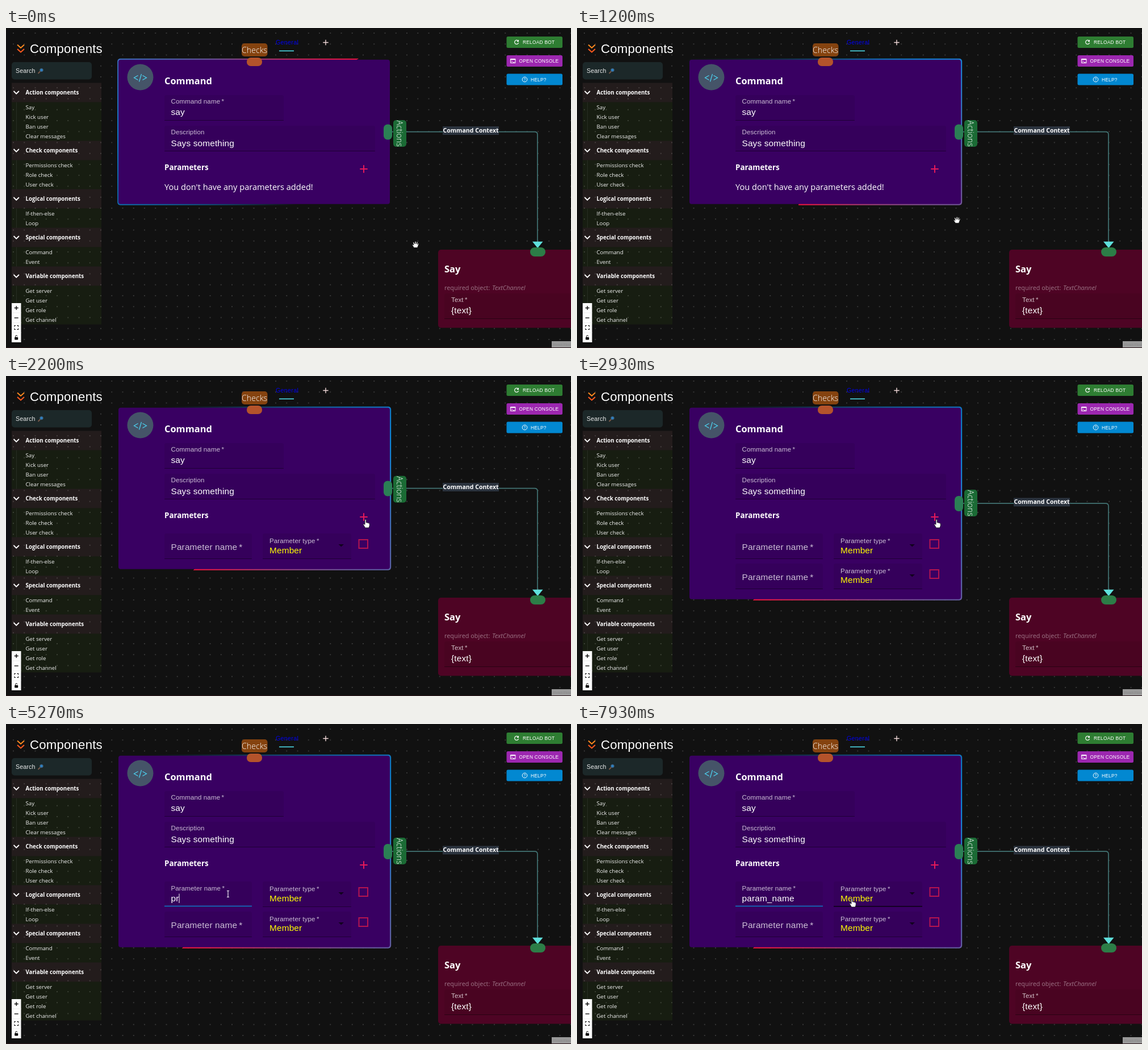
An HTML page that plays this animation: 995x563 px, repeating every 8000 ms.

```html
<!DOCTYPE html>
<html lang="en">
<head>
<meta charset="utf-8">
<title>Bot builder</title>
<style>
html, body { margin: 0; width: 100%; height: 100%; overflow: hidden; }
body { background: radial-gradient(circle, #484848 .5px, transparent 1.1px) 3.4px 18.6px / 19.25px 19.25px #111; }
#ring { position: absolute; left: 196px; top: 54px; width: 482px; border-radius: 5px; transform: translate(.2px, -.3px); }
svg { position: absolute; left: 0; top: 0; }
text { font-family: "Open Sans", "Noto Sans", sans-serif; fill: #fff; white-space: pre; }
.a { font-family: "Liberation Sans", Arial, sans-serif; letter-spacing: .00938em; }
.btn { letter-spacing: .02857em; }
.b { font-weight: 700; }
.l { font-weight: 300; }
.dim { fill-opacity: .75; }
</style>
</head>
<body>
<div id="ring"></div>
<svg id="stage" width="995" height="563" viewBox="0 0 995 563"></svg>
<script>
const text = (x, y, size, s, cls = '', more = '') =>
  `<text x="${x}" y="${y}" font-size="${size}" class="${cls}" ${more}>${s}</text>`;
const rect = (x, y, w, h, fill, r = 0, more = '') =>
  `<rect x="${x}" y="${y}" width="${w}" height="${h}" fill="${fill}" rx="${r}" ${more}/>`;
const line = (d, color, w = 1, more = '') =>
  `<path d="${d}" stroke="${color}" stroke-width="${w}" fill="none" ${more}/>`;
const shape = (d, fill, more = '') => `<path d="${d}" fill="${fill}" ${more}/>`;
const plus = (x, y, r, color, w) => line(`M${x - r} ${y}h${2 * r}M${x} ${y - r}v${2 * r}`, color, w);
const field = (x, y, w, h = 45) =>
  rect(x, y, w, h, '#000', 3, 'opacity=".07"') + rect(x, y + h - 1, w, 1, '#000', 0, 'opacity=".42"');
const label = (x, y, size, s, more) => text(x, y, size, s, 'a dim', more);

const BIG = 15.4, SMALL = 11.55;

function sidebar() {
  const sections = {
    Action: ['Say', 'Kick user', 'Ban user', 'Clear messages'],
    Check: ['Permissions check', 'Role check', 'User check'],
    Logical: ['If-then-else', 'Loop'],
    Special: ['Command', 'Event'],
    Variable: ['Get server', 'Get user', 'Get role', 'Get channel']
  };
  let out = line('M20 29.5l6 5.5 6-5.5', '#ff8a1f', 2) + line('M20 37l6 5.5 6-5.5', '#ff5a1f', 2) +
    text(42, 43.5, 22.2, 'Components', 'a') +
    rect(10, 60, 141, 30.5, '#1c2829', 5) + text(17, 79.3, 10.7, 'Search', 'a', 'fill-opacity=".9"') +
    line('M60.5 76l-4 4', '#7a5a4a', 1.8) +
    '<circle cx="62.5" cy="74" r="2.8" fill="#2f7fc0" stroke="#3d5a70"/>';
  let y = 96.5;
  for (const [name, items] of Object.entries(sections)) {
    const h = items.length * 17;
    out += rect(10, y, 158, 34, '#f79aa5', 0, 'opacity=".075"') +
      rect(10, y + 34, 158, h, '#90f020', 0, 'opacity=".05"') +
      line(`M18.5 ${y + 34}v${h}`, '#262c22') +
      line(`M13.5 ${y + 14.5}l4.7 4.7 4.7-4.7`, '#fff', 1.8) +
      text(34.5, y + 20.6, 9.7, name + ' components', 'b');
    items.forEach((s, i) => out += text(34.5, y + 46.3 + i * 16.9, 9.7, s, '', 'fill-opacity=".94"'));
    y += 34 + h;
  }
  return out + rect(10, 484, 16.5, 69, '#fefefe') +
    [501, 518.5, 536].map(v => line(`M10 ${v}h16.5`, '#eee')).join('') +
    plus(18.2, 492.5, 3.5, '#000', 1.3) + line('M14.7 510h7', '#000', 1.3) +
    line('M15 525.5v-2h2M19.5 523.5h2v2M21.5 528.5v2h-2M17 530.5h-2v-2', '#000', 1.1) +
    rect(15.2, 544, 6, 4.5, '#000', .8) + line('M16.6 544v-1.5a1.6 1.6 0 0 1 3.2 0', '#000', 1);
}

function toolbar() {
  const button = (y, fill, x, s) => rect(881.5, y, 98.5, 20, fill, 2.5) + text(x, y + 13, 8.4, s, 'a btn');
  return text(475, 28.5, 10.7, 'General', 'a btn', 'style="fill:#00e"') +
    rect(481, 39.5, 26, 1.6, '#4dd9e6') + plus(563, 25.5, 4.7, '#f0d8d8', 1.4) +
    button(15, '#2e7d32', 910, 'RELOAD BOT') + button(48, '#9c27b0', 903.5, 'OPEN CONSOLE') +
    button(80.5, '#0288d1', 924, 'HELP?') +
    line('M901.8 22.6a3.5 3.5 0 1 0 .8 3.2', '#fff', 1.2) + shape('M903 20.5v3.8h-3.8z', '#fff') +
    line('M888.5 54.5h8.5v7h-8.5zM888.5 55.5h8.5M890.2 57.5l1.5 1.3-1.5 1.3M893 60.3h2.5', '#fff', 1) +
    '<circle cx="913.5" cy="90.5" r="4.3" fill="none" stroke="#fff"/>' +
    text(911.6, 93.2, 7, '?', 'a');
}

function paramRow(id, dy, name) {
  return `<g id="${id}">` + field(279, 277 + dy, 154) + field(452, 277 + dy, 156) + name +
    label(464, 294.3 + dy, SMALL, 'Parameter type&thinsp;*') +
    text(464, 312 + dy * .983, BIG, 'Member', 'a', 'style="fill:#ff0"') +
    shape(`M585.5 ${296 + dy}h9.5l-4.75 4.5z`, '#12021f') +
    line(`M621.5 ${288 + dy}h15.5v15h-15.5z`, '#b5144f', 2) + '</g>';
}

function commandNode() {
  return rect(198, 55.7, 478, 254, '#390062', 4, 'id="body"') +
    rect(415, 27, 45.5, 23, '#85430f', 5) + text(415, 44, 14.2, 'Checks', 'l') +
    rect(424, 52, 27, 15, '#b4532b', 7) +
    '<circle cx="236.5" cy="86.5" r="23" fill="#455468"/>' +
    line('M232.5 83.5l-7 4 7 4M240.5 83.5l7 4-7 4M238.5 81l-4 13.5', '#4dd4f2', 1.2) +
    text(279, 98.7, 16.4, 'Command', 'b') +
    field(279, 118, 210) + label(290.5, 133, SMALL, 'Command name&thinsp;*') + text(290.5, 153.3, BIG, 'say', 'a') +
    field(279, 172, 371) + label(290.5, 187, SMALL, 'Description') + text(290.5, 207.5, BIG, 'Says something', 'a') +
    text(279, 250, 13.35, 'Parameters', 'b') + plus(630, 248, 6.7, '#e6195a', 2) +
    text(279, 285, 14.58, "You don't have any parameters added!", '', 'id="empty"') +
    paramRow('row1', 0, label(290.5, 306, BIG, 'Parameter name&thinsp;*', 'id="label"') +
      text(290.5, 312, BIG, '', 'a', 'id="value"') + rect(0, 298.5, 1, 16.5, '#fff', 0, 'id="caret"') +
      rect(279, 319.7, 154, 1.6, '#1976d2', 0, 'id="focus"') +
      rect(452, 320, 156, 1.3, '#10021c', 0, 'id="hover"')) +
    paramRow('row2', 53, label(290.5, 359, BIG, 'Parameter name&thinsp;*'));
}

function links() {
  return line('', '#427373', 1.7, 'id="edge"') + shape('M927 375.7h18.5l-9.25 11.5z', '#5fe0dc') +
    `<g id="tag">${rect(769, -10, 99, 15, '#2b333e')}${text(769.5, .9, 10.55, 'Command Context', 'b')}</g>` +
    `<g id="port">${rect(665, -13.5, 15, 27, '#2b7f55', 7)}</g>` +
    `<g id="actions">${rect(682, -23.5, 23, 47, '#1b6b35', 5)}${text(0, 0, 14.1, 'Actions', 'l', 'transform="translate(687.5 -23)rotate(90)"')}</g>`;
}

function sayNode() {
  return rect(761, 390, 240, 137.5, '#4e0424', 5) + rect(923, 386, 27, 16, '#2c7d47', 8) +
    text(772, 429.5, 16.5, 'Say', 'b') + text(772, 461, 10.9, 'required object:', '', 'fill-opacity=".45"') +
    text(856, 461, 11, 'TextChannel', '', 'fill-opacity=".45" font-style="italic"') +
    field(772, 467, 230) + label(784, 482, SMALL, 'Text&thinsp;*') + text(784, 502, BIG, '{text}', 'a') +
    rect(961, 551, 34, 11, '#999') + text(964, 559, 6, 'React Flow', 'a', 'style="fill:#8a8a8a"') +
    rect(0, 562, 995, 1, '#2c171b');
}

const outline = 'stroke="#111" stroke-width=".8" stroke-linejoin="round"';
const pointers = {
  grab: shape('M-2.5 5.5L-5.5 1q-.5-1.8 1.5-.8l1 .8-1.2-4.5q1-1.6 2 0L-1-1-.8-5q1.2-1.3 2 0L1.4-1 2.6-4.6q1.4-.8 1.6.6L3.5 0 4.6-2.2q1.4-.5 1.4.9L4.3 3.5 3.5 5.5z', '#fff', outline),
  hand: shape('M-1 1q1-1.8 2.2 0v5q1.5-.9 2.2.4 1.5-.6 2 .5 1.7-.3 1.8 1.2v3.5L6 15H-.5L-3.7 9.5q-.2-1.6 1.3-1.2L-1 9.5z', '#fff', outline),
  arrow: shape('M0 0v11.5l2.7-2.5 1.9 4 1.8-.8-1.9-3.9h3.7z', '#fff', outline),
  beam: line('M-2-5.5h1.5l.5.5.5-.5h1.5M0-5v10M-2 5.5h1.5l.5-.5.5.5h1.5', '#fff', 1.1)
};

stage.innerHTML = commandNode() + links() + sayNode() + sidebar() + toolbar() +
  '<g id="cursor">' + Object.entries(pointers).map(([k, s]) => `<g id="${k}">${s}</g>`).join('') + '</g>';

const $ = id => document.getElementById(id);
const set = (id, attrs) => { for (const k in attrs) $(id).setAttribute(k, attrs[k]); };
const show = (id, on) => $(id).style.display = on ? '' : 'none';

const LOOP = 8000, FOCUS = 3737, ROW1 = 2200, ROW2 = 2800, PAUSE = 1338;
const typing = [[FOCUS, ''], [4600, 'p'], [4930, 'pr'], [5000, 'pra'], [5270, 'pr'], [5400, 'p'], [5470, 'pa'],
  [5530, 'par'], [5600, 'para'], [5670, 'param'], [5930, 'param_'], [6330, 'param_n'], [6670, 'param_'],
  [6870, 'param_n'], [6930, 'param_na'], [7000, 'param_nam'], [7070, 'param_name']];
const path = [[0, 721, 381], [670, 715, 381], [870, 686, 355], [1200, 669, 338], [1340, 660, 312], [1730, 633, 265],
  [1930, 633, 252], [3230, 633, 252], [3640, 390, 296], [3860, 390, 296], [3870, 391, 298], [4070, 391, 299],
  [7590, 391, 299], [7930, 484, 307], [LOOP, 484, 307]];
const looks = [[0, 'grab'], [1650, 'hand'], [3330, 'arrow'], [3865, 'beam'], [7740, 'arrow'], [7810, 'hand']];

const latest = (list, t) => list.filter(k => k[0] <= t).pop();
const mix = (a, b, p) => a + (b - a) * p;

// cubic-bezier(0, 0, .2, 1)
function easeOut(x) {
  let lo = 0, hi = 1;
  for (let i = 0; i < 20; i++) {
    const s = (lo + hi) / 2;
    if (.6 * s * s * (1 - s) + s ** 3 < x) lo = s; else hi = s;
  }
  return lo * lo * (3 - 2 * lo);
}

function draw(t) {
  const h = t < ROW1 ? 258 : t < ROW2 ? 288 : 341, mid = 54 + h / 2;
  const angle = 54.8 + .121 * Math.min(t, PAUSE);
  $('ring').style.height = h + 'px';
  $('ring').style.background = `conic-gradient(from ${angle}deg, #0f86da00 95deg, #0f86da 215deg, #f0153e 360deg)`;
  set('body', { height: h - 4 });
  set('port', { transform: `translate(0 ${mid})` });
  set('tag', { transform: `translate(0 ${mid})` });
  set('actions', { transform: `translate(0 ${185.5 + .458 * (h - 258)})` });
  set('edge', { d: `M680 ${mid - .3}H931q5 0 5 5V377` });
  show('empty', t < ROW1);
  show('row1', t >= ROW1);
  show('row2', t >= ROW2);

  const p = easeOut(Math.min(1, Math.max(0, (t - FOCUS) / 200)));
  set('label', { 'font-size': mix(BIG, SMALL, p), y: mix(306, 293.2, p) });
  set('focus', { x: 356 - 77 * p, width: 154 * p });
  const [since, value] = latest(typing, t) || [Infinity, ''];
  $('value').textContent = value;
  set('caret', { x: 290.5 + (value ? $('value').getComputedTextLength() : 0) });
  show('caret', t >= since && (t - since) % 1060 < 530);

  const i = path.findIndex(k => k[0] > t), a = path[i - 1], b = path[i], q = (t - a[0]) / (b[0] - a[0]);
  const x = mix(a[1], b[1], q), y = mix(a[2], b[2], q), look = latest(looks, t)[1];
  set('cursor', { transform: `translate(${x} ${y})` });
  for (const k in pointers) show(k, k === look);
  show('hover', t > 7600 && x > 452);
}

const start = performance.now();
(function frame() {
  draw((performance.now() - start) % LOOP);
  requestAnimationFrame(frame);
})();
</script>
</body>
</html>
```
